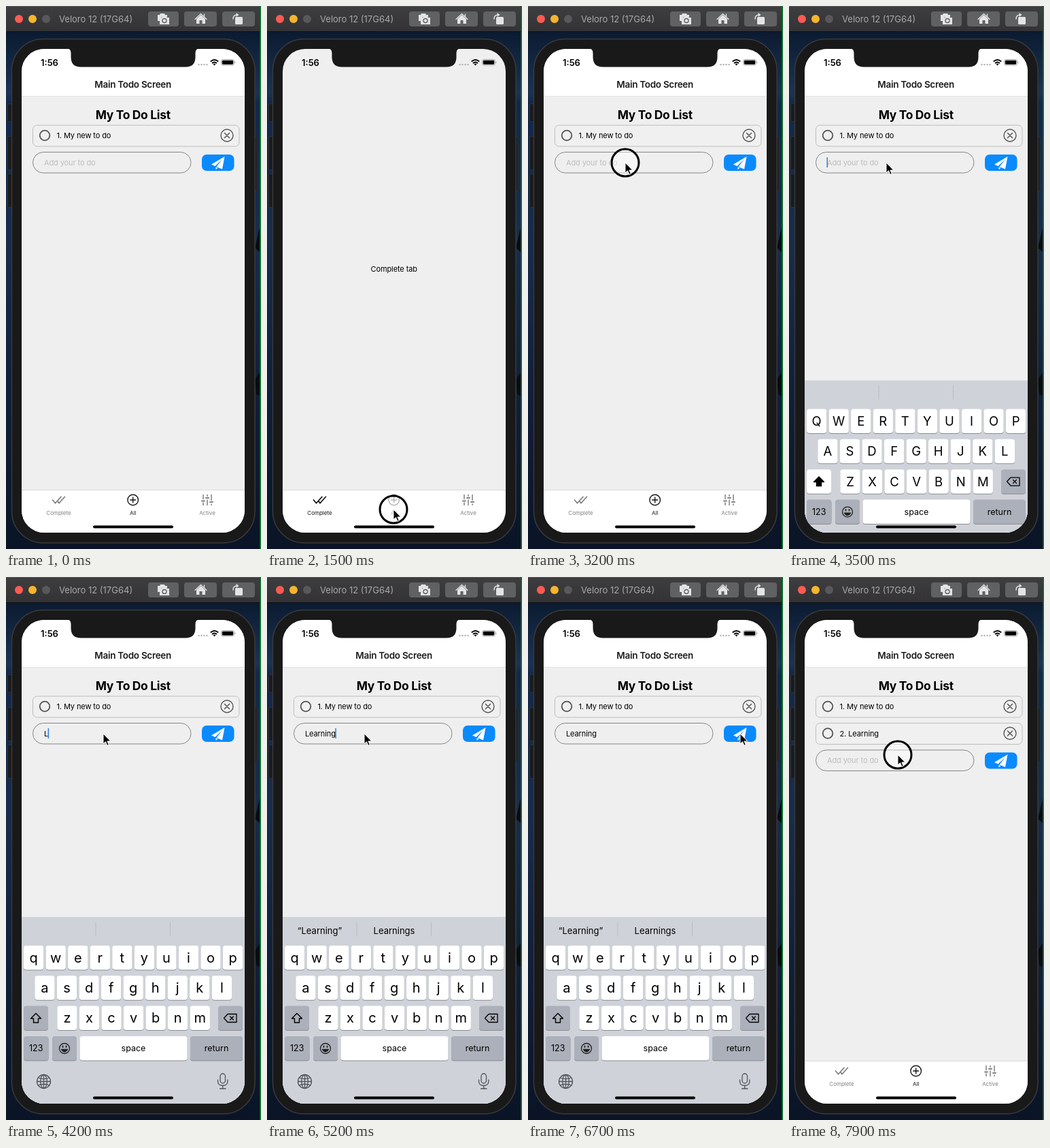
An HTML page that plays this animation: 375 px wide and 797 px high, repeating every 8 s.

```html
<!DOCTYPE html>
<html lang="en">
<head>
<meta charset="utf-8">
<title>Todo app</title>
<style>
  html, body { margin: 0; height: 100%; overflow: hidden; background: #0c1830; }
  svg { display: block; font-family: Inter, sans-serif; font-size: 11px; letter-spacing: -.1px; }
  .mid { text-anchor: middle; }
  .line { fill: none; stroke: currentColor; stroke-linecap: round; stroke-linejoin: round; }
  .tab { color: #808080; }
  .tab.on { color: #151515; }
  .tab text { fill: currentColor; font-size: 8px; letter-spacing: 0; }
  .keys text { text-anchor: middle; font-size: 12.5px; letter-spacing: 0; }
  .keys .letter { font-size: 20px; }
  .upper .letter { font-size: 18.5px; }
</style>
</head>
<body>
<svg width="375" height="797" viewBox="0 0 375 797">
  <defs>
    <linearGradient id="sky" x2="0" y2="1">
      <stop offset="0" stop-color="#0b1a30"/><stop offset=".12" stop-color="#1b3353"/>
      <stop offset=".14" stop-color="#13284a"/><stop offset=".4" stop-color="#182d4c"/>
      <stop offset=".7" stop-color="#101f3a"/><stop offset="1" stop-color="#0a1426"/>
    </linearGradient>
    <linearGradient id="bar" x2="0" y2="1">
      <stop offset="0" stop-color="#3e3e40"/><stop offset="1" stop-color="#333335"/>
    </linearGradient>
    <clipPath id="glass"><rect x="23" y="63" width="328" height="710" rx="33"/></clipPath>
    <g id="item">
      <rect x="39.5" y="175" width="303.5" height="31" rx="6" fill="#f0f0f0" stroke="#bdbdbd"/>
      <g class="line" color="#555">
        <circle cx="57" cy="190" r="7.3" stroke-width="1.8"/>
        <circle cx="325" cy="190" r="9" stroke-width="1.4"/>
        <path d="M321.5 186.500l7 7m0-7l-7 7" stroke-width="1.5"/>
      </g>
    </g>
  </defs>

  <rect y="36" width="375" height="761" fill="url(#sky)"/>
  <path d="M373 325l-7 30 7 6zM373 538l-7 10 2 22 5 2z" fill="#090c12"/>

  <g id="titlebar">
    <rect width="373" height="37" fill="url(#bar)"/>
    <path d="M0 .5H373" stroke="#58585a"/><path d="M0 37.500H373" stroke="#101114"/>
    <circle cx="19" cy="19" r="6" fill="#fc5b52"/>
    <circle cx="39" cy="19" r="6" fill="#f5b52d"/>
    <circle cx="59" cy="19" r="6" fill="#58585a"/>
    <text x="78" y="24" font-size="13" letter-spacing="0" fill="#a9a9ab">Veloro 12 (17G64)</text>
    <g fill="#606163">
      <rect x="209" y="8" width="45" height="22" rx="4"/>
      <rect x="262" y="8" width="48" height="22" rx="4"/>
      <rect x="318" y="8" width="48" height="22" rx="4"/>
    </g>
    <g fill="#e4e4e4">
      <path d="M223 22V13h3l1-2h6l1 2h3v3h-8l-2 2v4z"/>
      <path d="M226 27V17h3l1-1.500h6l1 1.500h3v10z"/>
      <circle cx="233" cy="21.500" r="3" fill="none" stroke="#606163" stroke-width="1.300"/>
      <path d="M280 19l6.500-6 6.500 6v7h-4.500v-5h-4v5H280z"/>
      <path d="M278 19.500l8.500-8 8.500 8M291.500 12v4" class="line" color="#e4e4e4" stroke-width="1.300"/>
      <rect x="337" y="16" width="11" height="11" rx="1.500"/>
      <path d="M334 19q0-6 6-6" class="line" color="#e4e4e4" stroke-width="1.500"/>
      <path d="M338.500 10l4 3-4 3z"/>
    </g>
  </g>
  <path d="M374.200 0V797" stroke="#12862f" stroke-width="1.600"/>

  <g fill="#1b1b1c" stroke="#323234">
    <rect x="2.500" y="143.500" width="8" height="26" rx="1.500"/>
    <rect x="2.500" y="191.500" width="8" height="49" rx="1.500"/>
    <rect x="2.500" y="246.500" width="8" height="49" rx="1.500"/>
    <rect x="362" y="192" width="7" height="79" rx="1.500"/>
    <rect x="8.500" y="48.500" width="357.500" height="739.500" rx="46" fill="#191919" stroke="#3a3a3c" stroke-width="1.500"/>
  </g>

  <g clip-path="url(#glass)">
    <rect x="23" y="63" width="328" height="710" fill="#efefef"/>
    <g id="list">
      <rect x="23" y="63" width="328" height="69.500" fill="#fff"/>
      <path d="M23 132.500H351" stroke="#e2e2e2"/>
      <text class="mid" x="186.700" y="120" font-size="13.500" font-weight="600" letter-spacing="-.3" fill="#1c1c1e">Main Todo Screen</text>
      <text class="mid" x="186.700" y="166" font-size="17.400" font-weight="700" letter-spacing="-.3">My To Do List</text>
      <use href="#item"/><text x="74.500" y="194">1. My new to do</text>
      <g id="second"><use href="#item" y="39.500"/><text x="74.500" y="233.500">2. Learning</text></g>
      <g id="form">
        <rect x="39.500" y="214.500" width="232.500" height="30.500" rx="15.250" fill="none" stroke="#858585"/>
        <text id="hint" x="56" y="233.500" fill="#bdbdbd">Add your to do</text>
        <text id="typed" x="56" y="233.500"></text>
        <rect id="caret" y="222" width="1.500" height="15" fill="#2f7fe0"/>
        <rect x="288" y="218" width="47.500" height="24" rx="7" fill="#0a8aff"/>
        <path d="M321.500 221L302 232.500l5.500 2.500L318 225l-8.500 11 8.500 3.500zM308.500 236.500v3.500l3-2.300z" fill="#fff"/>
      </g>
    </g>
    <text id="page" class="mid" x="186.700" y="390"></text>

    <rect x="23" y="711" width="328" height="62" fill="#fff"/>
    <path d="M23 710.500H351" stroke="#dadada"/>
    <g class="tab"><path class="line" stroke-width="1.700" d="M68.500 725l4 4.800 8.500-9.500M76 727l2 2.800 8.500-9.500"/>
      <text class="mid" x="77.500" y="747">Complete</text></g>
    <g class="tab"><circle class="line" cx="186.700" cy="725" r="7.800" stroke-width="1.400"/>
      <path class="line" stroke-width="1.400" d="M182.700 725h8M186.700 721v8"/>
      <text class="mid" x="186.700" y="747">All</text></g>
    <g class="tab"><path class="line" stroke-width="1.500" d="M290 717.500v6M290 729v3.500M296 717.500v2M296 725v7.500M302 717.500v8M302 731v1.500"/>
      <path class="line" stroke-width="2" d="M288 726.500h4M294 722h4M300 728h4"/>
      <text class="mid" x="296" y="747">Active</text></g>

    <g id="keyboard" class="keys"></g>
    <rect x="128" y="762.500" width="118" height="4" rx="2"/>

    <text x="51" y="87.500" font-size="13" font-weight="600" letter-spacing="0">1:56</text>
    <path d="M283.500 86h13" stroke="#b5b5b5" stroke-width="2.600" stroke-linecap="round" stroke-dasharray="0 4"/>
    <g class="line" color="#000" stroke-width="1.900" style="stroke-linecap:butt">
      <path d="M300.800 81.500q5.700-4.800 11.400 0M303 84q3.500-3 7 0"/>
    </g>
    <path d="M306.500 87.500l-2-2.200q2-1.500 4 0z"/>
    <rect x="316.500" y="78.500" width="19" height="8.500" rx="2.500" fill="none" stroke="#aaa"/>
    <rect x="317.800" y="79.800" width="16.400" height="5.900" rx="1.400"/>
    <path d="M337 81.500v2.500" stroke="#aaa"/>
  </g>
  <path d="M89 62q6.500.5 6.500 7v6q0 14.500 14.500 14.500H264q14.500 0 14.500-14.500v-6q0-6.500 6.500-7z" fill="#191919"/>

  <g id="pointer">
    <circle id="ring" r="20" fill="#fff" fill-opacity=".4" stroke="#000" stroke-width="3"/>
    <path d="M0 0V15l3.500-3.300 2.400 5.600 2.400-1-2.400-5.300h4.900z" stroke="#fff"/>
  </g>
</svg>

<script>
const $ = id => document.getElementById(id);
const LOOP = 8000, KEYBOARD_HEIGHT = 274, WORD = 'Learning';

// Pointer stops: time, x, y
const path = [
  [300, 150, 800], [800, 78, 732], [1000, 78, 732], [1400, 186, 739], [1650, 186, 739],
  [1880, 296, 733], [2060, 296, 733], [2240, 200.500, 734], [2450, 200.500, 734], [3050, 143, 230],
  [5300, 143, 230], [6050, 313, 366], [6300, 260.500, 332], [6500, 260.500, 332],
  [6700, 312, 230], [7400, 312, 230], [7750, 160, 261], [8000, 160, 261]
];
const presses = [[800, 950], [1400, 1600], [1900, 2050], [2240, 2450], [3080, 3220], [6720, 6880], [7750, 8000]];
const tabs = [[0, 1], [950, 0], [1600, 1], [2050, 2], [2450, 1]];
const FOCUS = 3220, SUBMIT = 6880, TYPE_START = 4130, TYPE_STEP = 110;

function buildKeyboard() {
  const key = (x, y, w, fill, label = '', cls = '') =>
    `<rect x="${x}" y="${y + 1}" width="${w}" height="35.500" rx="4" fill="#8b8d93"/>
     <rect x="${x}" y="${y}" width="${w}" height="35.500" rx="4" fill="${fill}"/>
     <text class="${cls}" x="${x + w / 2}" y="${y + (cls ? 24.5 : 22)}">${label}</text>`;
  const row = (letters, x, y) =>
    [...letters].map((c, i) => key(x + i * 32.55, y, 29.3, '#fff', c, 'letter')).join('');
  const gray = '#abb0ba';
  $('keyboard').innerHTML = `
    <rect x="23" y="499" width="328" height="274" fill="#d0d2d9"/>
    <path d="M132 507v20M241.500 507v20" stroke="#b9bcc3"/>
    <text id="guess" x="77.500" y="524" style="font-size:13px"></text>
    <text id="more" x="187" y="524" style="font-size:13px"></text>
    ${row('qwertyuiop', 26, 541) + row('asdfghjkl', 42.3, 585.3) + row('zxcvbnm', 75.3, 629.6)}
    <g id="shift">${key(26, 629.6, 36, gray)}</g>
    <path id="arrow" class="line" stroke-width="1.400" d="M44 640.500l-7.500 7.500h4v6h7v-6h4z"/>
    ${key(312, 629.6, 36, gray)}
    <path class="line" stroke-width="1.300" d="M320.500 647.500l5.500-6h13v12h-13zM329.500 645l5 5m0-5l-5 5"/>
    ${key(26, 674, 36.5, gray, '123') + key(68, 674, 36, gray)}
    ${key(108.5, 674, 158, '#fff', 'space') + key(271, 674, 77, gray, 'return')}
    <g class="line" color="#222" stroke-width="1.300">
      <circle cx="86" cy="692" r="7.500"/><path d="M81.500 693.500q4.500 7 9 0z" fill="#222"/>
      <path d="M83.500 688.500v1.500M88.500 688.500v1.500" stroke-width="1.800"/>
    </g>
    <g class="line" color="#50545b" stroke-width="1.300">
      <circle cx="55.500" cy="740.500" r="10"/><ellipse cx="55.500" cy="740.500" rx="4.800" ry="10"/>
      <path d="M55.500 730.500v20M45.500 740.500h20M47.500 735q8 3.500 16 0M47.500 746q8-3.500 16 0"/>
      <rect x="315" y="729" width="7.500" height="14" rx="3.750"/>
      <path d="M311.500 738v2q0 6.500 7.200 6.500t7.200-6.500v-2M318.700 746.500v4.500M314.500 751h8.500"/>
    </g>`;
}

const show = (id, on) => $(id).style.display = on ? '' : 'none';
const clamp = v => Math.min(1, Math.max(0, v));
const within = (t, [from, to]) => t >= from && t < to;

function pointerAt(t) {
  const i = Math.max(1, path.findIndex(p => p[0] > t));
  const [t0, x0, y0] = path[i - 1], [t1, x1, y1] = path[i];
  const k = (1 - Math.cos(Math.PI * clamp((t - t0) / (t1 - t0)))) / 2;
  return [x0 + (x1 - x0) * k, y0 + (y1 - y0) * k];
}

let wasUpper;
function setCase(upper) {
  if (upper === wasUpper) return;
  wasUpper = upper;
  $('keyboard').classList.toggle('upper', upper);
  document.querySelectorAll('.letter').forEach(k =>
    k.textContent = upper ? k.textContent.toUpperCase() : k.textContent.toLowerCase());
  $('shift').children[1].setAttribute('fill', upper ? '#fff' : '#abb0ba');
  $('arrow').style.fill = upper ? '#000' : 'none';
}

function draw(t) {
  const tab = tabs.filter(s => s[0] <= t).pop()[1];
  document.querySelectorAll('.tab').forEach((el, i) => el.classList.toggle('on', i === tab));
  show('list', tab === 1);
  $('page').textContent = ['Complete tab', '', 'Active tab'][tab];

  const focused = within(t, [FOCUS, SUBMIT]), added = t >= SUBMIT;
  const count = focused ? Math.max(0, Math.floor((t - TYPE_START) / TYPE_STEP) + 1) : 0;
  const text = WORD.slice(0, count);
  $('typed').textContent = text;
  show('hint', !text);
  show('second', added);
  $('form').setAttribute('transform', `translate(0 ${added ? 39.5 : 0})`);

  const typing = within(t, [TYPE_START, 5400]);
  show('caret', focused && (typing || within(t % 1000, [200, 700])));
  $('caret').setAttribute('x', 55.5 + (text ? $('typed').getComputedTextLength() : 0));

  const hidden = added ? clamp((t - SUBMIT) / 380) ** 2 : (1 - clamp((t - 3250) / 440)) ** 2;
  $('keyboard').setAttribute('transform', `translate(0 ${hidden * KEYBOARD_HEIGHT})`);
  show('keyboard', hidden < 1);
  setCase(!text && !added);
  $('guess').textContent = text.length > 3 ? `“${text}”` : '';
  $('more').textContent = text === WORD ? 'Learnings' : '';

  const [x, y] = pointerAt(t);
  show('pointer', t >= 300);
  $('pointer').setAttribute('transform', `translate(${x} ${y})`);
  show('ring', presses.some(p => within(t, p)));
}

function frame() {
  draw(performance.now() % LOOP);
  requestAnimationFrame(frame);
}

buildKeyboard();
frame();
</script>
</body>
</html>
```
